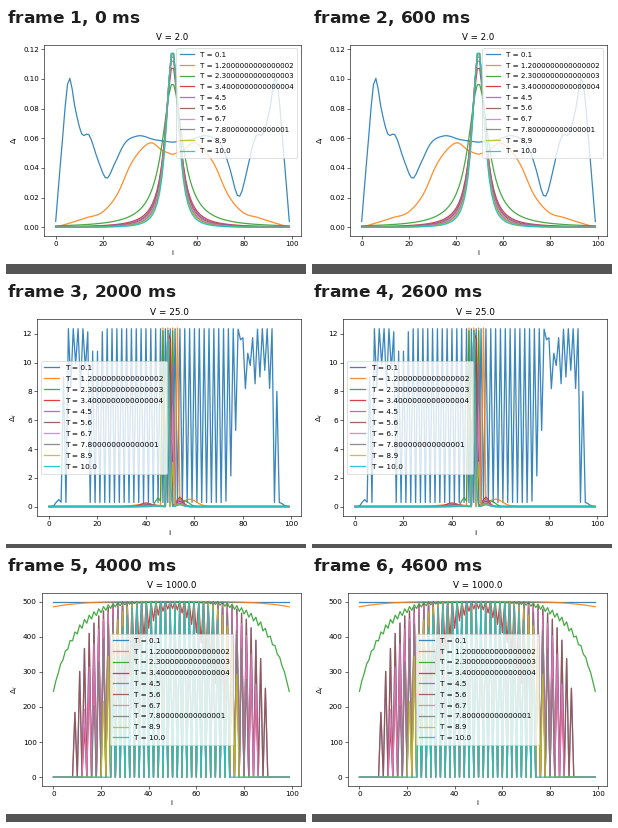
Animation, 300 px wide and 246 px high, one loop 5 s. Source, as a matplotlib script:

```python
import numpy as np
import matplotlib.pyplot as plt
from matplotlib.animation import FuncAnimation
from matplotlib.patches import Rectangle

W, H, DPI = 300, 246, 100
RIGHT = 295
site = np.arange(100)
x = site - 49.5
edge = 49.5 - np.abs(x)
odd = site % 2 == 1
temps = np.linspace(0.1, 10, 10)


def mirrored(*pts):
    """Cubic Hermite curve through key points, symmetric about the centre."""
    px, py = np.array(pts, float).T
    m = np.gradient(py, px)
    k = np.clip(np.searchsorted(px, edge, "right") - 1, 0, len(px) - 2)
    h = px[k + 1] - px[k]
    t = (edge - px[k]) / h
    return (py[k] * (1 + 2 * t) * (1 - t) ** 2 + m[k] * h * t * (1 - t) ** 2
            + py[k + 1] * t * t * (3 - 2 * t) + m[k + 1] * h * t * t * (t - 1))


def bump(center, height, width):
    return height * np.exp(-((site - center) / width) ** 2)


def dome(top, width, p=4):
    """Pairing amplitude in a harmonic trap, zero outside the width."""
    return top * np.sqrt(np.clip(1 - np.abs(x / width) ** p, 0, 1))


def comb(top, width, p=4):
    return np.where(odd, dome(top, width, p), 0)


def weak():
    blue = mirrored((0, .004), (2.5, .052), (5.5, .1), (8.5, .078),
                    (11, .063), (14, .0625), (18, .045), (21.5, .033),
                    (25, .043), (29, .056), (34.5, .0615), (42, .059),
                    (49.5, .0573))
    orange = mirrored((0, 0), (13, .0065), (20, .0105), (26, .022),
                      (32, .043), (36, .052), (40.5, .057), (45, .052),
                      (49.5, .049))
    rows = [blue - bump(78, .0125, 4), orange, .097 / (1 + (x / 5.2) ** 2)]
    for k in range(7):
        peak = .1205 - .0115 * np.exp(-k / 1.7)
        rows.append(peak / (1 + (x / 3.9) ** 2) ** (1.1 + .07 * k))
    return rows


def medium():
    rng = np.random.default_rng(4)
    blue = .33 + .08 * np.cos(site * .35) + bump(14, .3, 2)
    blue += bump(49.5, .4, 3) + bump(82, .3, 2)
    blue *= np.clip(edge / 5, .1, 1)
    for first, last in (6, 12), (30, 36), (42, 42), (56, 70), (86, 94):
        spikes = slice(first, last + 1, 2)
        blue[spikes] = 4.5 - 1.2 * rng.random(len(blue[spikes])) ** 4
    blue[56] = 2
    orange = .02 + bump(49.5, .95, 2.6) + bump(59, .25, 3.5) + bump(35, .05, 12)
    orange[[47, 52]] = 4.3, 4.55
    rows = [blue, orange]
    for k in range(8):
        y = .01 + bump(53 + k ** .5 * 2, .9 * .6 ** k, 2)
        y += bump(38, .12 * .75 ** k, 5) + bump(49, .5, 1.5)
        y[49] = 4.5
        rows.append(y)
    return rows


def strong():
    blue = np.where(odd, .3, 12.35 - bump(19, 2, 2) - bump(82, 1.7, 2))
    crowded = (site > 7) & (site < 17) | (site > 77) & (site < 92)
    blue = np.where(crowded & odd, 9 + .9 * np.sin(site * 1.3), blue)
    blue += np.where(odd, bump(77, 5, 2), 0)
    ends = (site < 6) | (site > 94)
    blue = np.where(ends, bump(4, .5, 1.5) + bump(95, .3, 2), blue)
    blue[[6, 94]] = 9, 8
    orange = .03 + bump(58, .5, 4) + bump(40, .15, 6)
    orange[47:54:2] = 12.4
    green = .02 + bump(45, .6, 1.5) + bump(56, .4, 2.5)
    green[47:52:2] = 12.2
    rows = [blue, orange, green]
    for k in range(7):
        y = .02 + bump(54, .65 * .75 ** k, 1.8) + bump(40 + k, .25 * .7 ** k, 3)
        y[49] = 12.2
        y[50 + k % 2] = 11.6 - 1.7 * k
        rows.append(y)
    return rows


def huge():
    ripple = .08 * np.sin(site * .9) * np.sin(site * .13)
    rows = [49.9 - .6 * np.exp(-edge / 5) + ripple]
    for T in temps[1:]:
        w = 25.8 / T
        tail = .5 * np.exp(-((np.abs(x) - w - 3) / 3) ** 2)
        rows.append(np.maximum(comb(50, w), .05 + tail))
    return rows


def extreme():
    jitter = np.where(odd, 12, -12) * np.clip(edge / 12, 0, 1) * np.abs(x) / 49.5
    green = np.minimum(dome(500, 53) + jitter, 499)
    inner = (np.abs(x) < 23) & ~odd
    red = np.where(inner, 480 - 330 * (x / 23) ** 2, comb(500, 37, 6))
    rows = [dome(500, 999), dome(500, 100.5), green, red]
    rows += [comb(500, min(41.5, 45.5 - 4 * k), 6) for k in range(6)]
    return rows


# V, left side of the axes, legend place, data
scenes = [
    (2.0, 38, "upper right", weak()),
    (10.0, 27.2, "center left", medium()),
    (25.0, 31, "center left", strong()),
    (100.0, 31, "center right", huge()),
    (1000.0, 35.7, "center", extreme()),
]

fig = plt.figure(figsize=(W / DPI, H / DPI), dpi=DPI, facecolor="white")


def scale_style(s):
    plt.rcParams.update({
        "font.family": "DejaVu Sans", "font.size": 10 * s,
        "lines.linewidth": 1.75 * s, "axes.linewidth": .8 * s,
        "patch.linewidth": s, "axes.titlepad": 6 * s, "axes.labelpad": 4 * s,
        "legend.labelspacing": .65, "legend.borderpad": .5,
    })
    for a in ("xtick", "ytick"):
        plt.rcParams.update({a + ".major.size": 3.5 * s,
                             a + ".major.width": .8 * s,
                             a + ".major.pad": 3.5 * s})


def draw(n):
    V, left, place, rows = scenes[n]
    s = (RIGHT - left) / 496
    top, height = 32 * s, 369.6 * s
    fig.clear()
    scale_style(s)
    ax = fig.add_axes([left / W, 1 - (top + height) / H,
                       (RIGHT - left) / W, height / H])
    for T, y in zip(temps, rows):
        ax.plot(site, y, alpha=.88, label=f"T = {float(T)}")
    ax.set_title(f"V = {V}")
    ax.set_xlabel("i")
    ax.set_ylabel(r"$\Delta_i$")
    ax.legend(loc=place)
    # dark strip below the chart
    strip = round(top + height + 54 * s)
    fig.add_artist(Rectangle((0, 0), 1, 1 - strip / H, color="#555555",
                             lw=0, transform=fig.transFigure))
    return []


anim = FuncAnimation(fig, draw, frames=len(scenes), interval=1000,
                     repeat=True, repeat_delay=0, blit=False)
plt.show()
```
